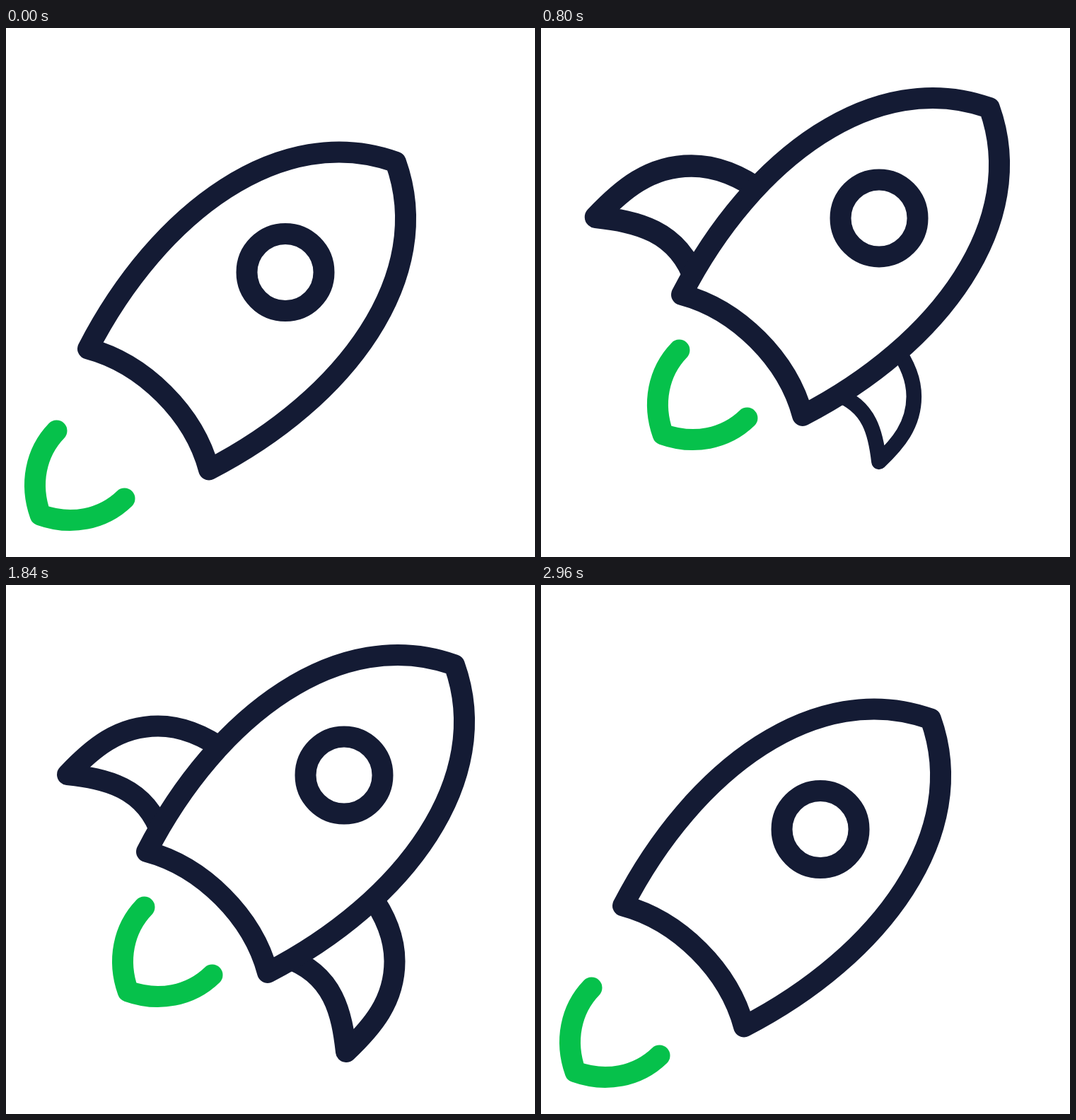
Recreate the animation shown at these times as an HTML page with a canvas. Size 748 by 748 pixels, loop 3040 ms.

```html
<!DOCTYPE html>
<html lang="en">
<head>
<meta charset="utf-8">
<title>Rocket</title>
<style>
html, body { margin: 0; width: 100%; height: 100%; overflow: hidden; background: #fff; }
canvas { display: block; width: 100vmin; height: 100vmin; }
</style>
</head>
<body>
<canvas id="stage" width="748" height="748"></canvas>
<script>
const ctx = document.getElementById('stage').getContext('2d');
const SIZE = 748, LOOP = 3040, STEP = 80;
const NAVY = '#141b34', GREEN = '#06c14b';

// The rocket is symmetric about the line x + y = 747.
const body = new Path2D(
  'M199 377 C299 183 473 55 634 113 C692 274 564 448 370 548 ' +
  'C349 469 278 398 199 377 Z');
const fin = new Path2D(
  'M312 236 C281 213 247 199.5 215 199.5 C159 199.5 122 231 87 268 ' +
  'C140 274 197 285 220 353');
const flame = new Path2D(
  'M195.5 455.5 C166 486 157 531 172.5 574.5 C216 590 261 581 291.5 551.5');
const porthole = new Path2D();
porthole.arc(478, 269, 54.5, 0, Math.PI * 2);

const FIN_ROOT = [254, 279];
const TRAVEL = 333, SWING = 14.6;

// Linear run from 0 to 1, followed by a damped swing around 1.
function springIn(t, start, amp, decay) {
  const run = (t - start) / TRAVEL;
  if (run <= 1) return Math.max(0, run);
  const s = (t - start - TRAVEL) / 1000;
  return 1 + amp * Math.sin(SWING * s) * Math.exp(-decay * s);
}

// 0 to 1, quick at first and slow at the end.
function easeOut(t, start, length, power) {
  const p = Math.min(1, Math.max(0, (t - start) / length));
  return 1 - Math.pow(1 - p, power);
}

const moveIn = (t, start) => springIn(t, start, 0.205, 12.4);
const growIn = (t, start) => springIn(t, start, 0.18, 8.5);

function drawFin(scale) {
  if (scale < 0.01) return;
  const [x, y] = FIN_ROOT;
  ctx.save();
  ctx.translate(x, y);
  ctx.scale(scale, scale);
  ctx.translate(-x, -y);
  ctx.lineCap = 'butt';
  ctx.stroke(fin);
  ctx.restore();
}

function drawRocket(away, upper, lower) {
  ctx.save();
  ctx.translate(-83 * away, 76.5 * away);
  ctx.strokeStyle = NAVY;
  drawFin(upper);
  ctx.save();
  ctx.transform(0, -1, -1, 0, 749, 747);
  drawFin(lower);
  ctx.restore();
  ctx.fill(body);
  ctx.stroke(body);
  ctx.stroke(porthole);
  ctx.restore();
}

function drawFlame(away) {
  ctx.save();
  ctx.translate(-124 * away, 114 * away);
  ctx.strokeStyle = GREEN;
  ctx.stroke(flame);
  ctx.restore();
}

function draw(t) {
  const leaving = t > 2320;
  const rocketAway = leaving ? easeOut(t, 2320, 680, 3) : 1 - moveIn(t, 11);
  const flameAway = leaving ? easeOut(t, 2320, 680, 3.4) : 1 - moveIn(t, 65);
  const upper = leaving ? 1 - easeOut(t, 2633, 320, 3) : growIn(t, 337);
  const lower = leaving ? 1 - easeOut(t, 2400, 340, 3) : growIn(t, 560);

  ctx.fillStyle = '#fff';
  ctx.fillRect(0, 0, SIZE, SIZE);
  ctx.lineWidth = 30;
  ctx.lineCap = ctx.lineJoin = 'round';
  drawRocket(rocketAway, upper, lower);
  drawFlame(flameAway);
}

function tick() {
  const t = performance.now() % LOOP;
  draw(Math.floor(t / STEP) * STEP);
  requestAnimationFrame(tick);
}
tick();
</script>
</body>
</html>
```
